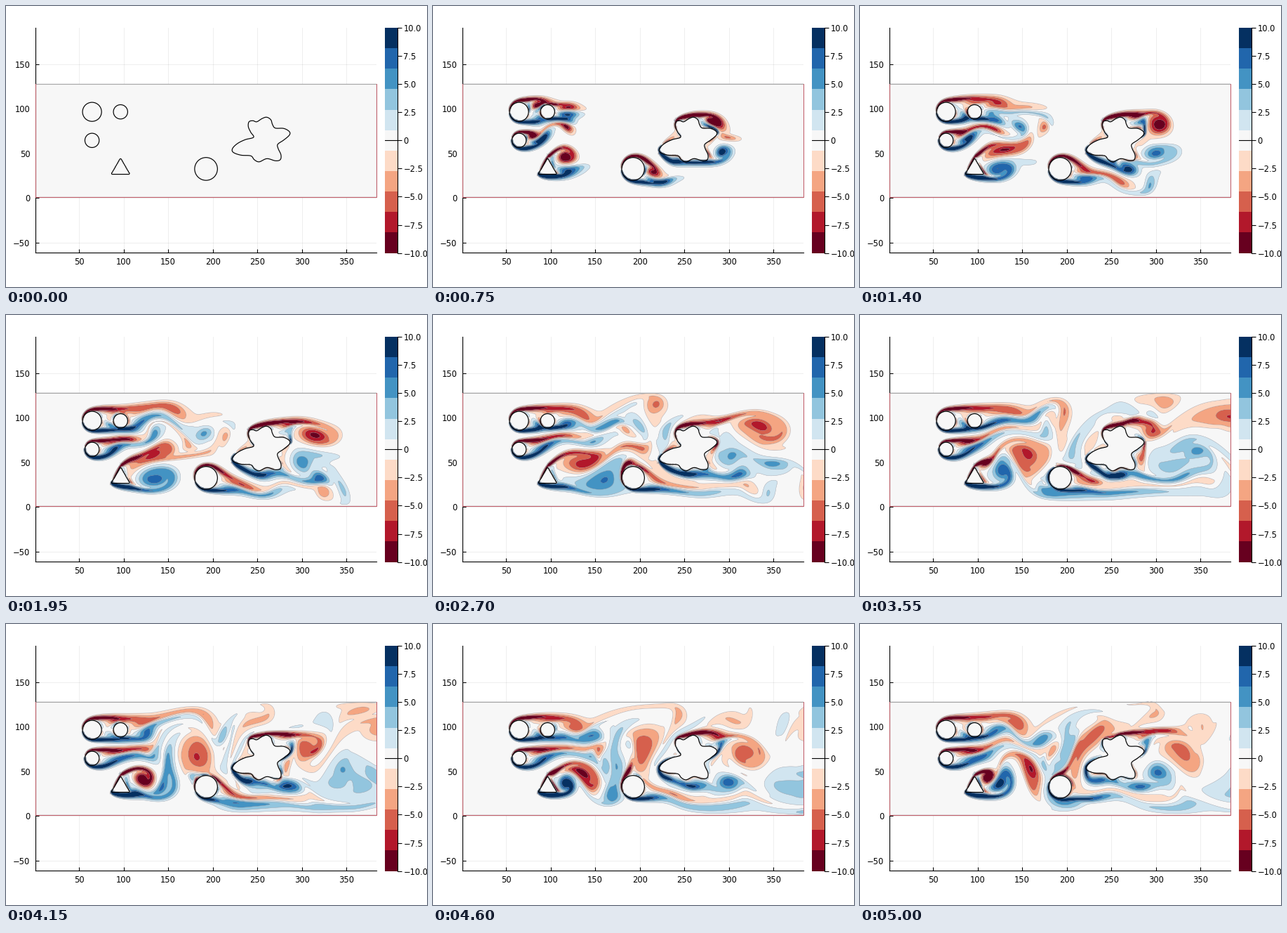
Recreate the animation shown at these times as a matplotlib script. Size 600 px wide and 400 px high, loop 5.05 s.

```python
import numpy as np
import matplotlib.pyplot as plt
from matplotlib.animation import FuncAnimation
from matplotlib.patches import Circle, Polygon
from matplotlib.path import Path

W, H = 600, 400
NX, NY = 384, 127            # unknown grid nodes of the channel flow
LENGTH, REYNOLDS = 32, 250
NU = LENGTH / REYNOLDS
FRAMES, INTERVAL = 101, 50
STEPS, SUBSTEPS = 3, 3       # per frame, per step
DT = 0.1 * LENGTH / STEPS
PLOT_W, PLOT_H = 486.2, 320
PX = PLOT_W / 383            # pixels per unit

COLORS = ["#67001f", "#b2182b", "#d6604d", "#f4a582", "#fddbc7", "#f7f7f7",
          "#d1e5f0", "#92c5de", "#4393c3", "#2166ac", "#053061"]
LEVELS = np.linspace(-10, 10, 12)

# ---------------------------------------------------------------- bodies
CIRCLES = [(64, 96, 10.67), (96, 96, 8), (64, 64, 8), (192, 32, 12.8)]
TRIANGLE = (96, 32, 10.67)
BLOB_CENTER = np.array([256, 64])
BLOB_KNOTS = np.array([
    (-13.5, 4.5), (-17.5, 11.5), (-21, 19.5), (-20, 26.5), (-14.5, 28),
    (-9, 26.5), (-1.5, 31), (5, 33), (11, 29.5), (13.5, 22.5),
    (17.5, 17.5), (29.5, 17), (37.5, 12.5), (37.5, 7.5), (29.5, 0.5),
    (21, -5.5), (21.5, -11.5), (25.5, -20.5), (24.5, -27.5), (17.5, -29),
    (5.5, -26), (-5.5, -30.5), (-12.5, -27.5), (-17.5, -22), (-31.5, -21),
    (-42.5, -17), (-43.5, -11.5), (-36.5, -4.5), (-25.5, 1)]) / PX


def closed_spline(p, n=8):
    """Catmull-Rom curve through the points of a closed outline."""
    a, c, d = np.roll(p, 1, 0), np.roll(p, -1, 0), np.roll(p, -2, 0)
    parts = [p + 0.5 * t * ((c - a) + t * ((2 * a - 5 * p + 4 * c - d)
                                           + t * (3 * (p - c) + d - a)))
             for t in np.arange(n) / n]
    return np.stack(parts, 1).reshape(-1, 2)


BLOB = closed_spline(BLOB_KNOTS) + BLOB_CENTER


def triangle_distance(x, y):
    cx, cy, r = TRIANGLE
    x, y = np.abs(x - cx), y - cy
    return np.maximum(-y, 0.5 * (np.sqrt(3) * x + y)) - r / np.sqrt(3)


def distance(x, y):
    """Signed distance to the nearest body, positive in the fluid."""
    d = triangle_distance(x, y)
    for cx, cy, r in CIRCLES:
        d = np.minimum(d, np.hypot(x - cx, y - cy) - r)
    near = np.hypot(x - BLOB_CENTER[0], y - BLOB_CENTER[1]) < 42
    pts = np.column_stack([x[near], y[near]])
    gap = np.hypot(pts[:, :1] - BLOB[:, 0], pts[:, 1:] - BLOB[:, 1]).min(1)
    gap[Path(BLOB).contains_points(pts)] *= -1
    d[near] = np.minimum(d[near], gap)
    return d


def solid(x, y):
    """Solid fraction: 1 inside the bodies, 0 in the fluid, smooth between."""
    x, y = np.meshgrid(x.astype(float), y.astype(float), indexing="ij")
    d = np.clip(distance(x, y), -1, 1)
    return (0.5 * (1 - d - np.sin(np.pi * d) / np.pi)).astype(np.float32)


# ---------------------------------------------------------------- flow
SOLID_U = solid(np.arange(1, NX + 1), np.arange(NY + 1) + 0.5)
SOLID_V = solid(np.arange(NX + 1) + 0.5, np.arange(1, NY + 1))

ax_angle = np.pi * (2 * np.arange(NX) + 1) / (2 * NX + 1)
ay_angle = np.pi * np.arange(1, NY + 1) / (NY + 1)
SX = np.sin(np.outer(np.arange(1, NX + 1), ax_angle)) * np.sqrt(4 / (2 * NX + 1))
SY = np.sin(np.outer(np.arange(1, NY + 1), ay_angle)) * np.sqrt(2 / (NY + 1))
INV = 1 / (4 - 2 * np.cos(ax_angle)[:, None] - 2 * np.cos(ay_angle))
SX, SY, INV = (m.astype(np.float32) for m in (SX, SY, INV))
SXT = np.ascontiguousarray(SX.T)


def stream(w):
    """Stream function of the disturbance, with its border nodes."""
    psi = np.zeros((NX + 2, NY + 2), np.float32)
    psi[1:-1, 1:-1] = SX @ ((SXT @ (w @ SY)) * INV) @ SY
    psi[-1] = psi[-2]
    return psi


def hold_still(w, psi, k):
    """Shed the vorticity that brings the flow inside the bodies to rest."""
    u = 1 + psi[1:-1, 1:] - psi[1:-1, :-1]
    v = psi[:-1, 1:-1] - psi[1:, 1:-1]
    e, f = -k * SOLID_U * u, -k * SOLID_V * v
    return w + (f[1:] - f[:-1]) - (e[:, 1:] - e[:, :-1])


def face_speeds(psi):
    s = psi[1:] + psi[:-1]
    r = psi[:, 1:] + psi[:, :-1]
    return 1 + (s[:, 2:] - s[:, :-2]) / 4, (r[:-2] - r[2:]) / 4


def flux(speed, size, aa, a, b, bb):
    """Third-order upwind transport plus diffusion."""
    step = b - a
    return (speed * (7 * (a + b) - (aa + bb))
            - size * (3 * step - (bb - aa))) / 12 - NU * step


def rate(w, u, v, au, av):
    p = np.zeros((NX + 4, NY + 4), np.float32)
    p[2:-2, 2:-2] = w
    p[-2:] = p[-3]
    px, py = p[:, 2:-2], p[2:-2]
    f = flux(u, au, px[:-3], px[1:-2], px[2:-1], px[3:])
    g = flux(v, av, py[:, :-3], py[:, 1:-2], py[:, 2:-1], py[:, 3:])
    return (f[:-1] - f[1:]) + (g[:, :-1] - g[:, 1:])


def transport(w, u, v):
    u, v = np.clip(u, -2.4, 2.4), np.clip(v, -1.6, 1.6)
    speeds = u, v, np.abs(u), np.abs(v)
    h = DT / SUBSTEPS
    for _ in range(SUBSTEPS):
        w1 = w + h * rate(w, *speeds)
        w2 = 0.75 * w + 0.25 * (w1 + h * rate(w1, *speeds))
        w = (w + 2 * (w2 + h * rate(w2, *speeds))) / 3
    return np.clip(w, -5, 5)


def settle(w):
    w = hold_still(w, stream(w), 2)
    psi = stream(w)
    return hold_still(w, psi, 1), psi


def picture(w):
    z = np.zeros((NX, NY + 1), np.float32)
    z[1:, 1:] = w[:-1] * LENGTH
    return np.clip(z, -9.99, 9.99).T


def simulate():
    w = np.zeros((NX, NY), np.float32)
    shots = [picture(w)]
    for _ in range(6):
        w, psi = settle(w)
    u, v = face_speeds(psi)
    u0, v0 = u, v
    for _ in range(FRAMES - 1):
        for _ in range(STEPS):
            w = transport(w, 1.5 * u - 0.5 * u0, 1.5 * v - 0.5 * v0)
            w, psi = settle(w)
            u0, v0 = u, v
            u, v = face_speeds(psi)
        shots.append(picture(w))
    return shots


shots = simulate()

# ---------------------------------------------------------------- stage
plt.rcParams.update({"font.family": "DejaVu Sans", "font.size": 8.3})
fig = plt.figure(figsize=(W / 100, H / 100), dpi=100, facecolor="white")


def add_axes(x, y, w, h):
    return fig.add_axes([x / W, 1 - (y + h) / H, w / W, h / H])


ax = add_axes(42, 31.3, PLOT_W, PLOT_H)
half = PLOT_H / PX / 2
ax.set_xlim(1, 384)
ax.set_ylim(64.5 - half, 64.5 + half)
ax.set_xticks(range(50, 351, 50))
ax.set_yticks(range(-50, 151, 50))
ax.tick_params(direction="in", length=3.4, width=0.8)
ax.tick_params(axis="x", pad=5)
ax.tick_params(axis="y", pad=5.5)
ax.set_axisbelow(True)
ax.grid(color="black", alpha=0.08, linewidth=0.6)
for side in ("top", "right"):
    ax.spines[side].set_visible(False)

# Edges of the channel
edge = dict(linewidth=0.75, clip_on=False, zorder=3)
ax.plot([1, 384], [128, 128], color="#a8a8a8", **edge)
ax.plot([1, 1, 384, 384], [128, 1, 1, 128], color="#c4606c", **edge)

# Body outlines, drawn at cell centres
outline = dict(fill=False, edgecolor="black", linewidth=0.85, zorder=4)
for cx, cy, r in CIRCLES:
    ax.add_patch(Circle((cx + 0.5, cy + 0.5), r, **outline))
ax.add_patch(Polygon(BLOB + 0.5, **outline))
gx, gy = np.meshgrid(np.arange(80, 114), np.arange(20, 50))
ax.contour(gx, gy, np.clip(triangle_distance(gx - 0.5, gy - 0.5), -0.2, 0.2),
           levels=[0], colors="black", linewidths=0.85, zorder=4)

# Colour scale
bar = add_axes(540, 31, 18, 320.6)
bar.set_xlim(0, 1)
bar.set_ylim(-10, 10)
for low, high, color in zip(LEVELS, LEVELS[1:], COLORS):
    bar.axhspan(low, high, color=color, linewidth=0)
bar.axhline(0, color="black", linewidth=0.8)
ticks = np.arange(-10, 10.1, 2.5)
bar.set_xticks([])
bar.set_yticks(ticks, [f"{t:.1f}".replace("-", "\u2212") if t else "0" for t in ticks])
bar.yaxis.tick_right()
bar.tick_params(axis="y", length=4.6, width=0.8, pad=1.4)
for side in ("left", "top", "bottom"):
    bar.spines[side].set_visible(False)

fills = []
grid_x, grid_y = np.arange(1, NX + 1), np.arange(1, NY + 2)


def draw(k):
    while fills:
        fills.pop().remove()
    fill = ax.contourf(grid_x, grid_y, shots[k], levels=LEVELS, colors=COLORS,
                       antialiased=True, zorder=1)
    fill.set_edgecolor((0.4, 0.4, 0.45, 0.35))
    fill.set_linewidth(0.35)
    fills.append(fill)
    return fills


def reset():
    return draw(0)


anim = FuncAnimation(fig, draw, frames=FRAMES, interval=INTERVAL, init_func=reset,
                     repeat=True, repeat_delay=0, cache_frame_data=False)
plt.show()
```
